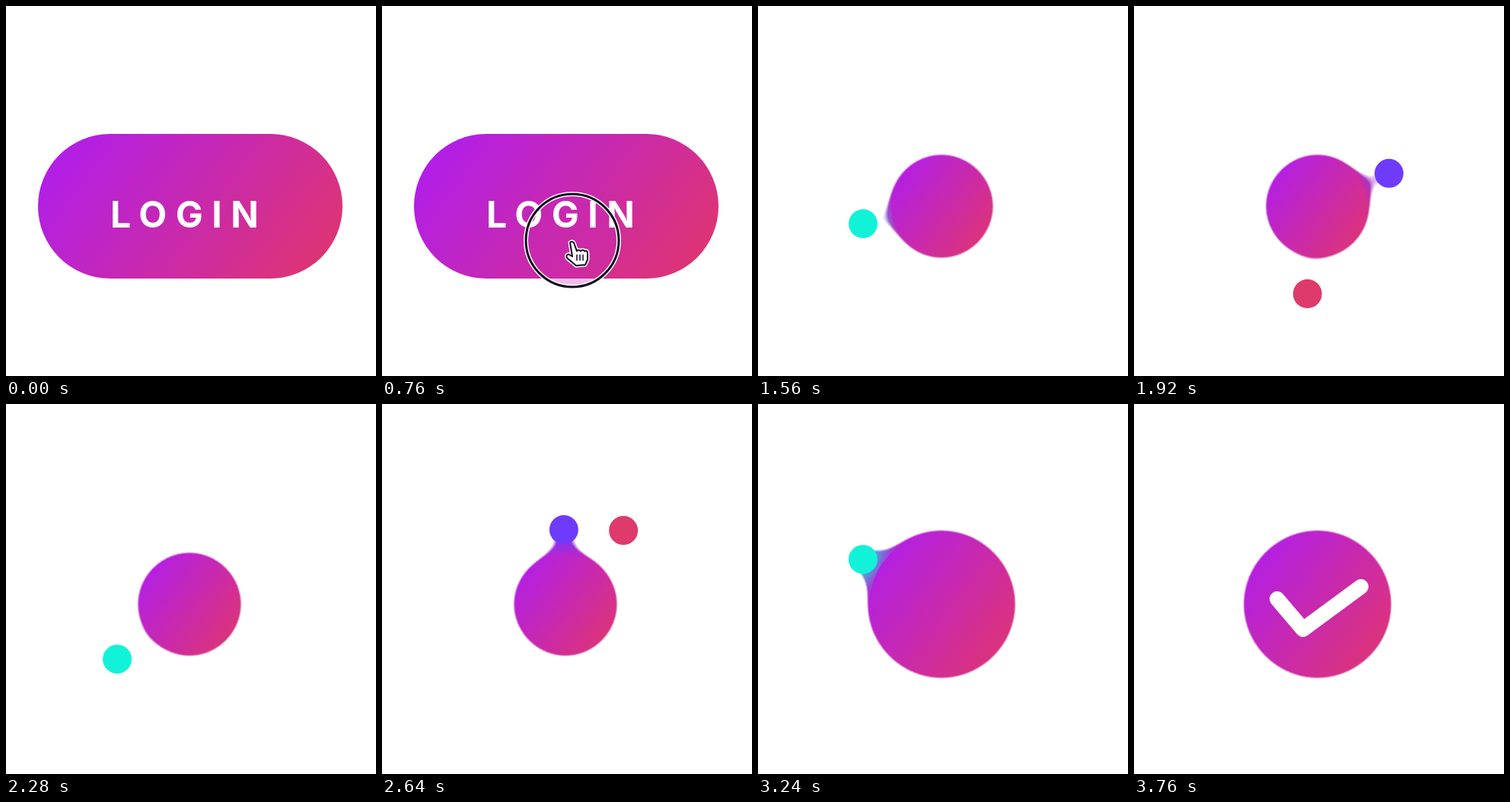
Animation of 486 by 486 pixels, one loop 3.8 s. Source, as an HTML page:

```html
<!DOCTYPE html>
<html lang="en">
<head>
<meta charset="utf-8">
<style>
  html, body { margin: 0; width: 100%; height: 100%; overflow: hidden; background: #fff; }
  svg { display: block; width: 100vw; height: 100vh; }
  text { font: 700 48px Inter, sans-serif; letter-spacing: 11.5px; fill: #fff; }
</style>
</head>
<body>
<svg viewBox="0 0 486 486">
  <defs>
    <linearGradient id="paint" gradientUnits="userSpaceOnUse">
      <stop stop-color="#ad1cf4"/>
      <stop offset="1" stop-color="#e23669"/>
    </linearGradient>
    <filter id="goo" filterUnits="userSpaceOnUse" x="0" y="0" width="486" height="486" color-interpolation-filters="sRGB">
      <feGaussianBlur stdDeviation="18"/>
      <feColorMatrix values="1 0 0 0 0  0 1 0 0 0  0 0 1 0 0  0 0 0 18 -7" result="blob"/>
      <feMerge><feMergeNode in="blob"/><feMergeNode in="SourceGraphic"/></feMerge>
    </filter>
    <path id="palm" d="M-2 2Q0-1 3 2L7 13Q9 10 12 13Q15 10 17 13Q21 11 21 16L21 24L18 31L6 32L-6 22Q-8 18-4 17L1 20Z"/>
  </defs>
  <circle id="pulse" cx="241" cy="263" fill="url(#paint)"/>
  <g id="blobs">
    <circle id="teal" r="19" fill="#12f2d8"/>
    <circle id="blue" r="19" fill="#6f3bfa"/>
    <circle id="red" r="19" fill="#de3a6b"/>
    <rect id="body" fill="url(#paint)"/>
  </g>
  <circle class="ring" cx="250" cy="308" fill="#c828b4" fill-opacity=".3"/>
  <text id="label" x="137" y="290.5">LOGIN</text>
  <path id="check" d="M188 256L222 296L298 240" pathLength="1" fill="none" stroke="#fff"
        stroke-width="20" stroke-linecap="round" stroke-linejoin="round"/>
  <circle class="ring" cx="250" cy="308" fill="none" stroke="#fff" stroke-width="6"/>
  <circle class="ring" cx="250" cy="308" fill="none" stroke="#140a1c" stroke-width="3"/>
  <g id="hand" fill="#fff" stroke-linejoin="round" stroke-linecap="round">
    <use href="#palm" stroke="#fff" stroke-width="5"/>
    <use href="#palm" stroke="#140a1c" stroke-width="2"/>
    <path d="M7 18v7M11 18v7M15 18v7" stroke="#1d1648" stroke-width="1.6"/>
  </g>
</svg>
<script>
const LOOP = 3800, CX = 241, CY = 263;
const $ = id => document.getElementById(id);
const rings = document.querySelectorAll('.ring');
const set = (el, attrs) => { for (const k in attrs) el.setAttribute(k, attrs[k]); };
const lerp = (a, b, p) => a + (b - a) * p;
const span = (t, a, b) => Math.min(1, Math.max(0, (t - a) / (b - a)));
const inOut = p => p < .5 ? 2 * p * p : 1 - 2 * (1 - p) ** 2;
const out = p => 1 - (1 - p) ** 3;

// Every dot makes three trips out of the blob: time and place of the farthest point.
const TRIP = 360, SWING = .0014;
const dots = {
  red: { turn: 1, trips: [[1160, 76, 84], [1920, -13, 115], [2640, 76, -97]] },
  blue: { turn: -1, trips: [[1160, 115, 68], [1920, 94, -43], [2640, -2, -98]] },
  teal: { turn: -1, trips: [[1540, -104, 20], [2280, -95, 72], [3240, -103, -59]] }
};

// Out and back along an arc around the blob centre, at rest between trips.
function dotAt({ turn, trips }, t) {
  const trip = trips.find(([peak]) => Math.abs(t - peak) < TRIP);
  if (!trip) return [0, 0];
  const [peak, x, y] = trip, dt = t - peak;
  const reach = Math.hypot(x, y) * Math.cos(dt / TRIP * Math.PI / 2);
  const angle = Math.atan2(y, x) + turn * SWING * dt;
  return [reach * Math.cos(angle), reach * Math.sin(angle)];
}

function draw(t) {
  const shrink = inOut(span(t, 820, 1000)), grow = inOut(span(t, 2880, 3180));
  const cx = lerp(242, CX, shrink);
  const hw = lerp(lerp(200, 66, shrink), 94.5, grow);
  const hh = lerp(lerp(95, 66, shrink), 94.5, grow);
  set($('body'), { x: cx - hw, y: CY - hh, width: 2 * hw, height: 2 * hh, rx: Math.min(hw, hh) });
  const reach = hw * .8 + hh * .6;
  set($('paint'), { x1: cx - reach * .8, y1: CY - reach * .6, x2: cx + reach * .8, y2: CY + reach * .6 });
  set($('blobs'), { filter: t < 820 ? 'none' : 'url(#goo)' });

  for (const id in dots) {
    const [x, y] = dotAt(dots[id], t);
    set($(id), { cx: CX + x, cy: CY + y });
  }

  set($('label'), { opacity: 1 - span(t, 800, 900) });

  set($('hand'), {
    transform: `translate(249 ${lerp(439, 309, inOut(span(t, 480, 720)))})`,
    opacity: t < 480 ? 0 : 1 - span(t, 860, 960)
  });
  const press = out(span(t, 660, 760));
  rings.forEach(ring => set(ring, { r: 61 * press, opacity: press > 0 ? 1 - span(t, 800, 920) : 0 }));

  const burst = span(t, 3380, 3720);
  set($('pulse'), { r: lerp(96, 157, out(burst)), opacity: .45 * (1 - burst) * (burst > 0) });

  const tick = inOut(span(t, 3440, 3700));
  set($('check'), { 'stroke-dasharray': `${tick} 2`, opacity: tick > 0 ? 1 : 0 });
}

function frame() {
  draw(performance.now() % LOOP);
  requestAnimationFrame(frame);
}
frame();
</script>
</body>
</html>
```
